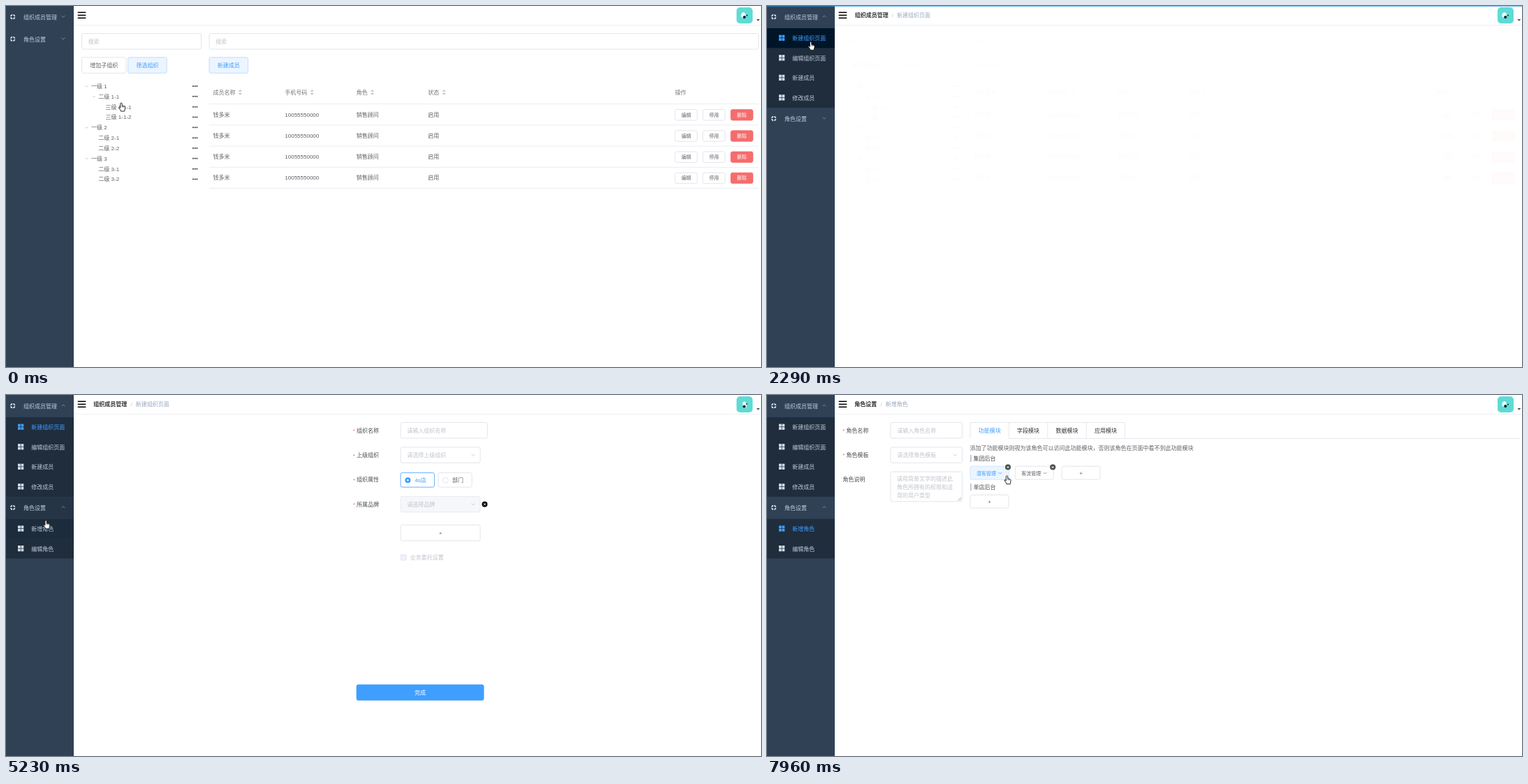
These frames come from a looping animation (1081x518 px, 8000 ms). An HTML page with a canvas:

```html
<!DOCTYPE html>
<html lang="zh-CN">
<head>
<meta charset="utf-8">
<style>
html, body { margin: 0; width: 100%; height: 100%; overflow: hidden; background: #fff }
canvas { display: block }
</style>
</head>
<body>
<canvas id="stage" width="1081" height="518"></canvas>
<script>
const c = document.getElementById('stage').getContext('2d');
const LOOP = 8000, SIDE = 97, TITLE_H = 31.7, ITEM_H = 28.55;
const BLUE = '#409eff', TEXT = '#606266', DARK = '#303133', HINT = '#c0c4cc',
      BORDER = '#dcdfe6', MENU = '#bfcbd9';
const FAMILY = '"Liberation Sans", "Noto Sans CJK SC", "Noto Sans CJK", sans-serif';

// ---------- timing ----------
const clamp = x => Math.max(0, Math.min(1, x));
const bez = (u, a, b) => 3 * u * (1 - u) ** 2 * a + 3 * u * u * (1 - u) * b + u ** 3;
function ease(x) { // CSS "ease"
  if (x <= 0 || x >= 1) return clamp(x);
  let lo = 0, hi = 1;
  for (let i = 0; i < 20; i++) {
    const m = (lo + hi) / 2;
    bez(m, .25, .25) < x ? lo = m : hi = m;
  }
  return bez(lo, .1, 1);
}
const smooth = x => (x = clamp(x)) * x * (3 - 2 * x);
const fade = (t, start, dur = 500) => ease((t - start) / dur);
const during = (t, a, b) => fade(t, a, 300) * (1 - fade(t, b, 300));

// ---------- drawing helpers ----------
function text(s, x, y, color = TEXT, { size = 8, weight = 400, align = 'left' } = {}) {
  c.font = `${weight} ${size}px ${FAMILY}`;
  c.textAlign = align;
  c.fillStyle = color;
  c.fillText(s, x, y + size * .37);
}
const mid = (s, x, y, color, size) => text(s, x, y, color, { size, align: 'center' });

function rect(x, y, w, h, color) {
  c.fillStyle = color;
  c.fillRect(x, y, w, h);
}
function box(x1, y1, x2, y2, border = BORDER, fill = '#fff', r = 2.3) {
  c.beginPath();
  c.roundRect(x1, y1, x2 - x1, y2 - y1, r);
  c.fillStyle = fill;
  c.fill();
  c.strokeStyle = border;
  c.lineWidth = .8;
  c.stroke();
}
function line(color, width, ...pts) {
  c.beginPath();
  for (let i = 0; i < pts.length; i += 2) c.lineTo(pts[i], pts[i + 1]);
  c.strokeStyle = color;
  c.lineWidth = width;
  c.stroke();
}
function poly(color, ...pts) {
  c.beginPath();
  for (let i = 0; i < pts.length; i += 2) c.lineTo(pts[i], pts[i + 1]);
  c.fillStyle = color;
  c.fill();
}
function dot(x, y, r, color) {
  c.beginPath();
  c.arc(x, y, r, 0, 7);
  c.fillStyle = color;
  c.fill();
}
// flip runs from 1 (pointing down) to -1 (pointing up)
const chevron = (x, y, color = HINT, w = 2.6, flip = 1) =>
  line(color, .8, x - w, y - w / 2 * flip, x, y + w / 2 * flip, x + w, y - w / 2 * flip);

function button(s, x1, y1, x2, y2, { color = TEXT, border, fill, size } = {}) {
  box(x1, y1, x2, y2, border, fill);
  mid(s, (x1 + x2) / 2, (y1 + y2) / 2, color, size);
}
const PLAIN_BLUE = { color: BLUE, border: '#b3d8ff', fill: '#ecf5ff' };

function input(hint, x1, y1, x2, y2, arrow) {
  box(x1, y1, x2, y2);
  text(hint, x1 + 9.3, (y1 + y2) / 2, HINT);
  if (arrow) chevron(x2 - 10, (y1 + y2) / 2);
}
function label(s, x, y, required = true) {
  if (required) text('*', x - 5.3, y + .5, '#f56c6c');
  text(s, x, y, '#4c4e52', { weight: 500 });
}
function closeIcon(x, y, color) {
  dot(x, y, 4, color);
  line('#fff', 1, x - 1.5, y - 1.5, x + 1.5, y + 1.5);
  line('#fff', 1, x + 1.5, y - 1.5, x - 1.5, y + 1.5);
}

// ---------- pages ----------
const TREE = [[0, '一级 1', 1], [1, '二级 1-1', 1], [2, '三级 1-1-1'], [2, '三级 1-1-2'],
  [0, '一级 2', 1], [1, '二级 2-1'], [1, '二级 2-2'],
  [0, '一级 3', 1], [1, '二级 3-1'], [1, '二级 3-2']];
const COLUMNS = [['成员名称', 296.5, '钱多米'], ['手机号码', 399.3, '10055550000'],
  ['角色', 501.7, '销售顾问'], ['状态', 604.3, '启用']];

function listPage() {
  input('搜索', 108.5, 39.5, 279.5, 62);
  input('搜索', 291, 39.5, 1077.5, 62);
  button('增加子组织', 108.5, 73.7, 172, 96.3);
  button('筛选组织', 174.7, 73.7, 230.2, 96.3, PLAIN_BLUE);
  button('新建成员', 291, 73.7, 346.5, 96.3, PLAIN_BLUE);

  TREE.forEach(([level, name, open], i) => {
    const x = 122 + level * 10.3, y = 115 + i * 14.83;
    text(name, x, y);
    if (open) chevron(x - 6.5, y + .2, '#b4b8c0', 1.7);
    for (let k = 0; k < 3; k++) dot(268 + k * 2.7, y, 1, DARK);
  });

  for (const [name, x, value] of COLUMNS) {
    text(name, x, 124, '#74777d');
    const sx = x + name.length * 8 + 6.8;
    poly(HINT, sx - 2.7, 122.8, sx, 120, sx + 2.7, 122.8);
    poly(HINT, sx - 2.7, 125, sx, 127.8, sx + 2.7, 125);
    for (let i = 0; i < 4; i++) text(value, x, 155.8 + i * 30.2);
  }
  text('操作', 958, 124, '#74777d');
  for (let i = 0; i < 5; i++) rect(291, 140.2 + i * 30.25, 786.5, .8, '#e6e9f0');
  for (let i = 0; i < 4; i++) {
    const y = 148.6 + i * 30.2;
    button('编辑', 958, y, 989.8, y + 15.4, { size: 7 });
    button('停用', 997.8, y, 1029.5, y + 15.4, { size: 7 });
    button('删除', 1037.8, y, 1069.4, y + 15.4,
      { size: 7, color: '#fff', border: '#f56c6c', fill: '#f56c6c' });
  }
}

function groupPage() {
  ['组织名称', '上级组织', '组织属性', '所属品牌'].forEach((s, i) => label(s, 502, 50.8 + i * 35.3));
  input('请输入组织名称', 565, 39.5, 689.3, 62);
  input('请选择上级组织', 565, 75, 679, 97.4, true);

  box(565, 111.6, 613.4, 132.2, BLUE);
  dot(575.3, 122.2, 4, BLUE);
  dot(575.3, 122.2, 1.3, '#fff');
  text('4s店', 585.3, 122, BLUE);
  box(619, 111.6, 667, 132.2);
  box(625.5, 118.4, 633.3, 126.2, BORDER, '#fff', 4);
  text('部门', 639, 122);

  box(565, 145.6, 679, 168, '#e4e7ed', '#f5f7fa');
  text('请选择品牌', 574.3, 156.8, HINT);
  chevron(669, 156.8);
  closeIcon(685.4, 156.8, '#000');
  button('+', 565, 186.4, 679, 209);
  box(565.2, 229.2, 573, 237, BORDER, '#edf2fc', 1);
  text('业务委托设置', 578.8, 233.2, HINT);
  button('完成', 502, 415.8, 684, 438, { color: '#fff', border: BLUE, fill: BLUE });
}

function rolePage(t) {
  label('角色名称', 113.6, 50.8);
  label('角色模板', 113.6, 86);
  label('角色说明', 108.4, 121.5, false);
  input('请输入角色名称', 177, 39.5, 279.4, 62);
  input('请选择角色模板', 177, 75, 279.4, 97.4, true);
  box(177, 110.2, 279.4, 152.8);
  ['请用简单文字的描述此', '角色所拥有的权限和适', '用的用户类型']
    .forEach((s, i) => text(s, 186, 120 + i * 12, HINT));
  line('#777', .6, 273.5, 151.5, 278, 147);
  line('#777', .6, 276, 151.5, 278, 149.5);

  const edge = '#e0e3ea';
  line(edge, .8, 291, 62.5, 291, 39.5, 512.4, 39.5, 512.4, 62.5);
  line(edge, .8, 346.4, 62.5, 1077.5, 62.5);
  ['功能模块', '字段模块', '数据模块', '应用模块'].forEach((s, i) => {
    const x = 291 + i * 55.4;
    if (i) line(edge, .8, x, 39.5, x, 62.5);
    mid(s, x + 27.7, 51, i ? DARK : BLUE);
  });

  text('添加了功能模块则视为该角色可以访问此功能模块，否则该角色在页面中看不到此功能模块', 290.6, 76);
  [['集团后台', 91], ['单店后台', 132]].forEach(([s, y]) => {
    rect(291, y - 5, 1.8, 10, HINT);
    text(s, 295.4, y, '#4c4e52');
  });

  const hot = t > 7830;
  [['潜客管理', 291, hot], ['客流管理', 355.2, false]].forEach(([s, x, on]) => {
    box(x, 102.2, x + 55.2, 121.2, on ? '#c6e2ff' : BORDER, on ? '#ecf5ff' : '#fff');
    text(s, x + 9, 112, on ? BLUE : TEXT, { size: 7 });
    chevron(x + 42.8, 112, on ? BLUE : '#85888e', 2.3);
    closeIcon(x + 54, 103.6, '#4a4a4a');
  });
  button('+', 422, 102.2, 477, 121.2);
  button('+', 291, 143.4, 346, 162.2);
}

// ---------- frame around the pages ----------
function withAlpha(a, draw, dx = 0) {
  if (a <= 0) return;
  c.save();
  c.globalAlpha *= a;
  c.translate(dx, 0);
  draw();
  c.restore();
}

function crumbs(t) {
  const slide = 11.4;
  const trail = (parent, child) => {
    const x = 125.3 + parent.length * 8;
    text(parent, 125.3, 13.5, DARK, { weight: 700 });
    text('/', x + 5.2, 13.5, HINT);
    text(child, x + 12.4, 13.5, '#97a8be');
  };
  const first = fade(t, 1900), second = fade(t, 5400), third = fade(t, 6400);
  withAlpha(first * (1 - second), () => trail('组织成员管理', '新建组织页面'),
    (1 - first + second) * slide);
  if (t < 6400) withAlpha(second, () => text('角色设置', 125.3, 13.5), (1 - second) * slide);
  else {
    text('角色设置', 125.3, 13.5, DARK, { weight: 700 });
    withAlpha(third, () => {
      text('/', 162.5, 13.5, HINT);
      text('新增角色', 169.7, 13.5, '#97a8be');
    }, (1 - third) * slide);
  }
}

function avatar(t) {
  c.beginPath();
  c.roundRect(1046, 2, 23, 23, 5);
  c.fillStyle = '#5fdbd5';
  c.fill();
  const first = t % 440 < 154;
  c.beginPath();
  if (first) c.ellipse(1055.5, 13, 3, 4, .3, 0, 7);
  else c.ellipse(1057.5, 14, 2.8, 4.6, -.2, 0, 7);
  c.fillStyle = '#f4fbfb';
  c.fill();
  dot(first ? 1057.2 : 1057, first ? 16 : 16.5, 2.1, '#152024');
  dot(first ? 1061 : 1060.5, first ? 13.5 : 12.8, 1, '#152024');
  poly('#444', 1074.4, 19, 1079.4, 19, 1076.9, 21.6);
}

function progress(t, start) {
  const d = t - start;
  if (d < 0 || d > 500) return;
  withAlpha(1 - clamp((d - 300) / 200), () => rect(0, 0, 1081 * ease(d / 250), 1.2, '#29d'));
}

function topBar(t) {
  for (let i = 0; i < 3; i++) rect(102.7, 8.5 + i * 4, 11.6, 1.5, '#000');
  rect(SIDE, 27, 1081 - SIDE, 1, '#eef0f2');
  crumbs(t);
  avatar(t);
}

// each menu: title, click time, title hover span, items [name, hover spans, active span]
const MENUS = [
  ['组织成员管理', 720, [600, 1060], [
    ['新建组织页面', [1060, 3050], [1900, 5400]],
    ['编辑组织页面', [3050, 3700]],
    ['新建成员', [3700, 4115]],
    ['修改成员', [4115, 4440]]]],
  ['角色设置', 4800, [4440, 5210], [
    ['新增角色', [5210, 6990], [6400, LOOP]],
    ['编辑角色', [6990, 7070]]]]
];

function shade(t, span, y, h, color) {
  withAlpha(during(t, ...span), () => rect(0, y, SIDE, h, color));
}

function sidebar(t) {
  rect(0, 0, SIDE, 518, '#304156');
  let y = 0;
  for (const [title, click, span, items] of MENUS) {
    const open = smooth((t - click) / 300), cy = y + TITLE_H / 2;
    shade(t, span, y, TITLE_H, '#263445');
    c.strokeStyle = '#dfe6ee';
    c.lineWidth = 1.8;
    for (let k = 0; k < 4; k++) {
      const a = k * Math.PI / 2;
      c.beginPath();
      c.arc(9.7, cy - .3, 2.9, a + .22, a + 1.35);
      c.stroke();
    }
    text(title, 25, cy + .1, MENU);
    chevron(82, cy - .8, '#8592a2', 2.5, 1 - 2 * open);
    y += TITLE_H;

    const h = items.length * ITEM_H * open;
    c.save();
    c.beginPath();
    c.rect(0, y, SIDE, h);
    c.clip();
    rect(0, y, SIDE, h, '#1f2d3d');
    items.forEach(([name, hover, active], i) => {
      const top = y + i * ITEM_H, iy = top + ITEM_H / 2;
      const on = active && t >= active[0] && t < active[1];
      shade(t, hover, top, ITEM_H, '#001528');
      for (let k = 0; k < 4; k++)
        rect(17 + k % 2 * 4.5, iy - 4.4 + (k >> 1) * 4.5, 3.8, 3.8, on ? BLUE : '#d3dce6');
      text(name, 36.3, iy + .2, on ? BLUE : MENU);
    });
    c.restore();
    y += h;
  }
}

// ---------- pointer ----------
const PATH = [[0, 165, 139], [120, 165, 139], [380, 105, 120], [620, 56, 18], [800, 54, 17],
  [1060, 58, 33], [1500, 64, 55], [1630, 64.5, 59], [1850, 63, 50], [2900, 62, 53],
  [3050, 62.3, 60], [3100, 62.5, 71.5], [3500, 63, 80], [3700, 64, 89], [4000, 64.5, 104],
  [4150, 65, 124], [4440, 61, 146], [4750, 58, 158], [5100, 58, 166], [5350, 56.3, 192.5],
  [6910, 56.3, 192.5], [7100, 85, 238], [7350, 115, 225], [7600, 175, 145],
  [7720, 215, 125], [7920, 343.5, 115.8], [LOOP, 343.5, 115.8]];
const HAND = new Path2D('M-1.2 .8Q0-1 1.2 .8V4L4.4 4.9Q5.9 5.4 5.6 7.4L4.8 10.6V12H-.6L-.9 10.5' +
  'L-3.4 7Q-3.7 5.5-2.3 6L-1.2 7.2Z');

function pointer(t) {
  const i = PATH.findIndex(p => p[0] > t);
  const [t0, x0, y0] = PATH[i - 1], [t1, x1, y1] = PATH[i];
  const k = (t - t0) / (t1 - t0);
  c.save();
  c.translate(x0 + (x1 - x0) * k, y0 + (y1 - y0) * k);
  c.fillStyle = '#fff';
  c.fill(HAND);
  c.strokeStyle = '#111';
  c.lineWidth = .9;
  c.stroke(HAND);
  line('#111', .6, 1.3, 4.2, 1.3, 6.5);
  line('#111', .6, 3.2, 4.8, 3.2, 6.8);
  c.restore();
}

function frame(now) {
  const t = Math.max(0, now) % LOOP;
  rect(0, 0, 1081, 518, '#fff');
  withAlpha(1 - fade(t, 1900), listPage);
  withAlpha(fade(t, 2400) * (1 - fade(t, 5400, 440)), groupPage);
  withAlpha(fade(t, 6750), () => rolePage(t));
  topBar(t);
  sidebar(t);
  [1900, 5400, 6400].forEach(start => progress(t, start));
  pointer(t);
  requestAnimationFrame(frame);
}
requestAnimationFrame(frame);
</script>
</body>
</html>
```
